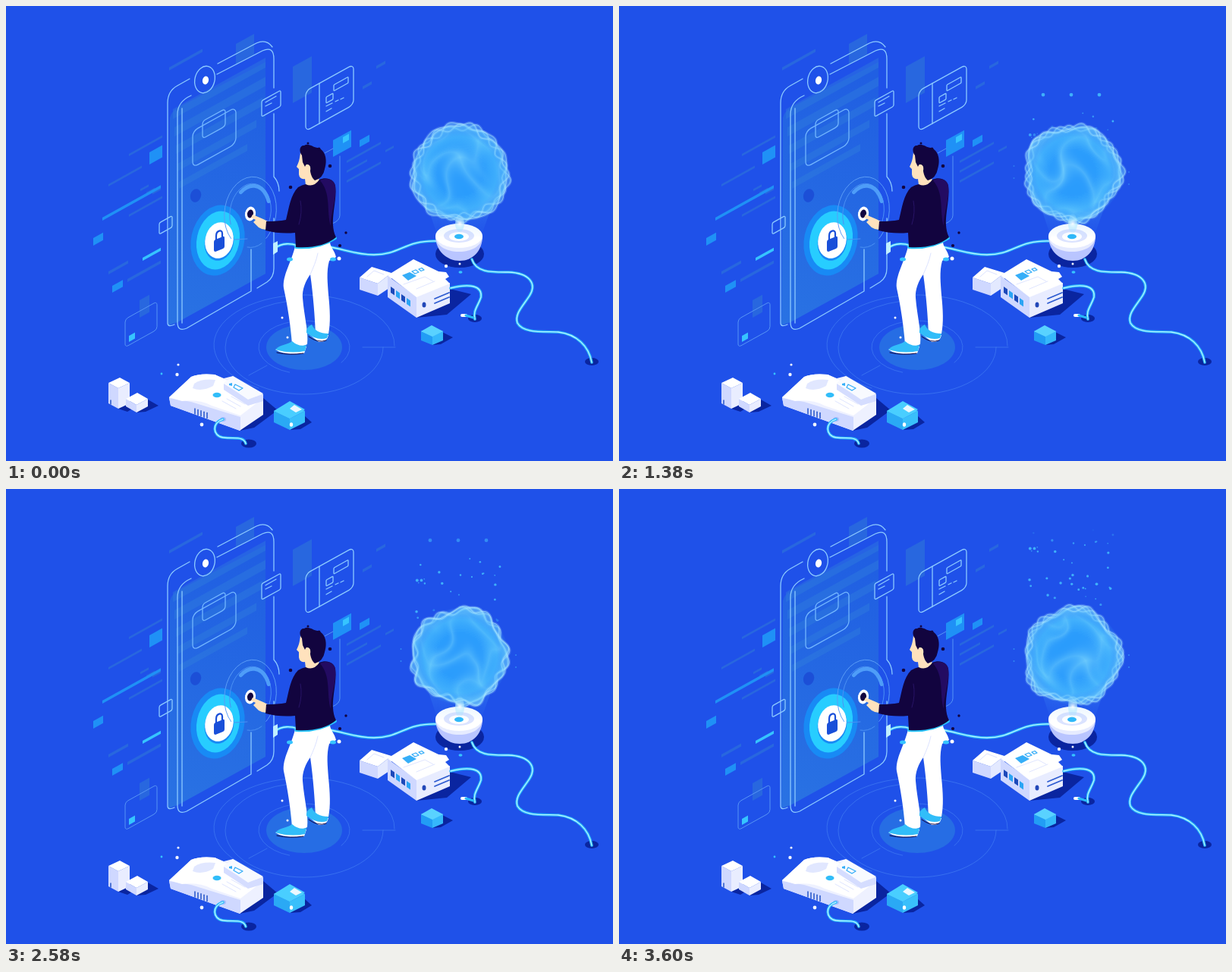
An HTML page with a canvas that plays this animation: 800 by 600 pixels, repeating every 3.63 s.

```html
<!DOCTYPE html>
<html lang="en">
<head>
<meta charset="utf-8">
<title>Isometric lock screen</title>
<style>
  html, body { margin: 0; width: 100%; height: 100%; overflow: hidden; background: #1f51e9; }
  canvas { display: block; }
</style>
</head>
<body>
<canvas id="stage" width="800" height="600"></canvas>
<script>
const LOOP = 3630, TAU = Math.PI * 2;
const DIM = '#2867df', BRIGHT = '#1f91f6', CYAN = '#36c4ff', PALE = '#8ccaff',
      SHADE = '#0a25a0', NAVY = '#12043f', SKIN = '#ffe2bd', LILAC = '#cfd8ff';
const stage = document.getElementById('stage').getContext('2d');
const scene = makeCanvas(800, 600);
let g = scene;

function makeCanvas(w, h) {
  const c = document.createElement('canvas');
  c.width = w;
  c.height = h;
  return c.getContext('2d');
}
const repeat = (count, draw) => { for (let i = 0; i < count; i++) draw(i); };
const clamp = v => Math.max(0, Math.min(1, v));
function random(seed) {
  const v = Math.sin(seed * 127.1 + 3.7) * 43758.5;
  return v - Math.floor(v);
}
function fill(color, d) {
  g.fillStyle = color;
  g.fill(new Path2D(d));
}
function line(color, d, width = 1.3) {
  g.strokeStyle = color;
  g.lineWidth = width;
  g.lineCap = g.lineJoin = 'round';
  g.stroke(new Path2D(d));
}
function oval(color, x, y, rx, ry = rx, tilt = 0) {
  g.fillStyle = color;
  g.beginPath();
  g.ellipse(x, y, rx, ry, tilt, 0, TAU);
  g.fill();
}
function ring(color, x, y, rx, ry, width = 1, from = 0, to = TAU, tilt = 0) {
  g.strokeStyle = color;
  g.lineWidth = width;
  g.beginPath();
  g.ellipse(x, y, rx, ry, tilt, from, to);
  g.stroke();
}
// Rectangle lying on the tilted wall plane
function wallPath(x, y, w, h, r) {
  g.save();
  g.transform(1, -.555, 0, 1, x, y);
  g.beginPath();
  g.roundRect(0, 0, w, h, r);
  g.restore();
}
function slab(color, x, y, w, h) {
  wallPath(x, y, w, h, 0);
  g.fillStyle = color;
  g.fill();
}
function frame(color, x, y, w, h, r = 2, width = 1.3) {
  wallPath(x, y, w, h, r);
  g.strokeStyle = color;
  g.lineWidth = width;
  g.stroke();
}
// Block seen from above; x, y is the near corner of its top
function box(x, y, left, right, drop, rise, top, leftFace, rightFace) {
  fill(leftFace, `M${x},${y} l${-left},${-rise} v${drop} l${left},${rise} z`);
  fill(rightFace, `M${x},${y} l${right},${-rise} v${drop} l${-right},${rise} z`);
  fill(top, `M${x},${y} l${-left},${-rise} l${right},${-rise} l${left},${rise} z`);
}
function cable(d) {
  line('#27b9fb', d, 3.6);
  line('#b7f0ff', d, 1.3);
}

function drawWall() {
  const glass = g.createLinearGradient(225, 420, 345, 100);
  glass.addColorStop(0, '#2972e3');
  glass.addColorStop(1, '#205fe2');
  fill(glass, 'M216,148 Q217,140 227,134 L342,74 V353 L226,417 L214,421 Z');

  // Text-like streaks
  repeat(5, i => slab('rgba(50,130,220,.36)', 220 + i * 2, 136 + i * 24, 122 - i * i * 2, 13 - i));
  repeat(3, i => slab(DIM, i % 2 ? 135 : 162, 195 + i * 40, 44, 3));
  repeat(3, i => slab(DIM, 449, 204 + i * 13, 45 - (i % 2) * 18, 3));
  repeat(3, i => slab(DIM, 177 + i * 8, 238 - i * 4 + random(i) * 20, 11, 3));
  repeat(2, i => slab(DIM, 488 - i * 18, 79 + i * 27, 12, 4));
  repeat(2, i => slab(DIM, 135 + i * 25, 350 + i * 10, 26 + i * 18, 4));
  slab(DIM, 500, 190, 11, 3);
  slab(DIM, 215, 81, 44, 4);
  slab(DIM, 303, 50, 24, 27);
  slab(DIM, 378, 80, 25, 48);
  slab(DIM, 176, 388, 13, 23);
  slab(BRIGHT, 127, 279, 77, 4);
  slab(BRIGHT, 189, 193, 17, 16);
  slab(BRIGHT, 115, 306, 13, 10);
  slab(BRIGHT, 140, 369, 14, 9);
  slab(BRIGHT, 431, 177, 24, 22);
  slab(BRIGHT, 466, 177, 13, 9);
  slab(CYAN, 180, 332, 24, 4);
  slab(CYAN, 162, 435, 8, 8);
  slab(CYAN, 444, 173, 8, 8);
  frame('#5795f5', 157, 413, 42, 37, 4, 1);
  line('#5795f5', 'M420,194 L431,188 M440,198 V276 Q440,283 430,287', 1);

  // Phone outlines
  line(PALE, 'M213,418 V128 Q213,112 226,105 L242,96 M213,418 Q213,424 222,420');
  line(PALE, 'M279,76 L330,49 Q343,43 351,54 M278,90 L338,59 Q353,52 353,70 V108 M353,142 V225 Q360,233 360,244');
  line(PALE, 'M353,280 V346 Q353,358 344,364 L331,372');
  line(PALE, 'M244,118 Q226,126 226,143 V417 Q226,430 238,425 L323,376 V321 M232,135 V418');
  ring(PALE, 262, 97, 13, 18, 1.3, 0, TAU, .25);
  oval('#fff', 263, 98, 4, 5.5, .25);
  frame('#72b6ff', 246, 165, 57, 48, 7);
  frame('#72b6ff', 259, 152, 30, 23, 4);
  slab('rgba(31,81,233,.8)', 337, 125, 25, 21);
  frame(PALE, 337, 125, 25, 21);
  line(PALE, 'M342,127 L356,119 M342,132 L350,128');
  frame(PALE, 202, 286, 17, 15);
  oval('#1c4fd7', 250, 250, 7, 9, .3);

  // Bank-card panel
  frame(PALE, 395, 112, 63, 53, 6);
  line(PALE, 'M413,102 V155 M422,132 L430,128 M434,126 L438,124 M441,123 L445,121 M422,139 L429,135');
  frame(PALE, 432, 104, 19, 8, 1);
  frame(PALE, 422, 120, 9, 8, 1);

  // Lock
  oval('#188af5', 279, 309, 35, 47, .22);
  oval('#27cdff', 279.5, 309, 28, 39, .22);
  oval('#188af5', 281, 311, 19, 25, .22);
  oval('#fff', 281, 309, 18.5, 24, .22);
  fill('#194fd9', 'M274,311 Q274,309 276,308 L286,304 Q288,303 288,306 V317 Q288,319 286,320 L276,324 Q274,324 274,322 Z');
  line('#194fd9', 'M277,308 V303 C277,296 285,294 285,300 V305', 2.2);

  // Touch rings
  ring('#5b9df7', 322, 272, 34, 47, 1, 2.2, 7, .15);
  ring('#4b91f4', 322, 272, 27, 38, 1, 2.6, 6.5, .15);
  ring('#4e9df8', 323, 272, 24, 35, 5, 3.9, 5.75, .15);
  line('#4b91f4', 'M301,308 L318,307 M318,318 Q328,320 337,313', 1);
  oval('#fff', 322, 274, 7, 9.5, .2);
  oval(NAVY, 322, 274, 4, 5.5, .2);
}

function drawFloor() {
  const faint = 'rgba(78,139,246,.65)';
  ring(faint, 393, 447, 119, 66, .8, 2.1, 6.3);
  ring(faint, 393, 450, 104, 62, .8, 0, 4.5);
  ring(faint, 393, 450, 60, 35, .8, 1.9, 6.9);
  line(faint, 'M470,450 H513 M344,474 L320,487', .8);
  oval('#266de4', 393, 450, 50, 30);
}

function drawMan() {
  // Legs
  fill('#fff', `M381,317 L427,312 C428,319 433,322 435,331 L426,336 C422,350 424,366 425,381
    C427,400 428,418 425,432 Q417,439 408,432 C407,410 405,382 401,354 C395,362 390,374 391,385
    C393,410 399,430 397,446 Q387,452 377,446 C375,420 371,395 366,372 C364,356 376,338 381,317 Z`);
  line('#dce3ff', 'M401,354 C405,345 409,336 411,326', 1);
  // Shoes
  fill('#fff', 'M355,453 Q366,461 393,458 L396,449 L380,447 Z M396,430 L412,443 Q423,444 425,434 L408,430 Z');
  line(NAVY, 'M357,457 Q374,461 392,458 M399,436 Q411,445 422,441', 1);
  fill('#31bdf9', 'M355,453 C361,446 372,447 377,442 Q386,450 396,447 L394,455 Q374,459 355,453 Z');
  fill('#31bdf9', 'M396,431 Q395,424 403,420 Q408,432 425,432 L423,438 Q410,442 396,431 Z');
  // Head
  fill(SKIN, `M388,193 C387,202 386,206 383,212 L386,215 L386,222 Q387,229 394,228
    L395,236 Q405,242 413,232 L411,219 L414,201 L398,191 Z`);
  fill(NAVY, `M390,197 C385,190 388,183 393,184 C399,180 405,187 411,187 C421,190 424,203 420,215
    Q418,227 407,230 C402,226 401,219 400,211 Q396,206 394,212 L391,206 Z`);
  fill(SKIN, 'M395,211 q4,-4 6,1 q1,6 -2,7 z');
  // Hand
  fill(SKIN, 'M347,285 L339,281 Q332,278 325,275 L323,279 L329,282 L326,285 L333,292 Q339,296 346,294 Z');
  // Sweater
  line('#29c4fa', 'M382,318 Q412,320 434,306', 4);
  fill(NAVY, `M395,235 Q405,240 413,229 C422,225 432,228 434,237 C437,259 425,284 435,305
    Q417,320 382,318 L381,299 Q361,301 342,296 L343,284 Q358,284 369,282
    C373,266 375,249 385,239 Q390,236 395,235 Z`);
  fill('#230b62', 'M414,230 C422,226 432,228 434,237 C436,257 427,275 428,290 C422,270 429,248 414,230 Z');
  line('#281466', 'M388,257 Q391,272 386,288', 1);
  // Flecks
  repeat(3, i => oval(NAVY, 398 + i * 14.5, 181 + i * i * 7.5, 1.5 + i * .4));
  repeat(2, i => oval(NAVY, 448 - i * 8, 299 + i * 17, 1.7 + i * .4));
  oval(NAVY, 375, 239, 2.3);
  repeat(2, i => oval('#fff', 364 + i * 7, 411 + i * 26, 1.5));
  repeat(2, i => oval(CYAN, 374 + i * 57, 334, 4, 2.5));
  oval('#fff', 439, 333, 2.5);
}

function drawGadgets() {
  // Base of the orb
  oval(SHADE, 598, 327, 32, 18);
  fill('#b9c5ff', 'M566,303 C566,323 581,336 598,336 S628,323 628,303 Z');
  fill('#e6ebff', 'M566,303 C566,316 580,324 597,324 S628,316 628,303 Z');
  oval('#fff', 597, 303, 31, 16);
  oval('#dbe3ff', 597, 303, 20, 9);
  oval('#fff', 597, 304, 13, 6);
  oval('#2fb8f8', 597, 304, 6, 3.3);
  oval(SHADE, 772, 469, 9, 5);
  cable(`M614,334 C620,352 640,351 662,351 C690,352 700,366 690,382 C681,396 670,406 674,418
    C682,432 708,429 728,430 C752,433 768,448 772,470`);

  // Console and its neighbour
  fill(SHADE, 'M541,411 L581,407 L613,380 L585,373 Z');
  fill(LILAC, 'M466,358 L490,366 V382 L466,374 Z');
  fill('#e3e9ff', 'M490,366 L508,352 V370 L490,382 Z');
  fill('#fff', 'M466,358 L482,344 L508,352 L490,366 Z');
  line('#dbe2ff', 'M476,357 L485,349 L498,354', 1);
  fill(LILAC, 'M503,356 L541,383 V411 L503,384 Z');
  fill('#e8ecff', 'M541,383 L585,365 V392 L541,411 Z');
  fill('#fff', 'M503,355 L537,334 L570,350 L580,351 L584,357 L579,360 L585,366 L541,384 Z');
  line('#e0e6ff', 'M524,367 L552,357 L563,363 M541,373 L565,363', 1);
  fill('#36aef8', 'M522,355 L532,351 L541,356 L530,362 Z');
  line('#36aef8', 'M535,350 l5,-2 l4,3 l-5,2 z M544,347 l4,-1.5 l3,2.5 l-4,1.5 z');
  repeat(4, i => fill(i % 2 ? '#2aa4f4' : '#1c49ba', `M${507 + i * 7},${370 + i * 5} l5,3.6 v8 l-5,-3.6 z`));
  oval('#2248b8', 551, 394, 2.5, 3.5);
  line('#2d5bd0', 'M565,386 L584,378 M565,392 L584,384', 1.8);
  oval(SHADE, 618, 412, 9, 5);
  cable('M586,372 C610,366 628,368 626,384 C622,396 615,402 618,413');
  line('#fff', 'M601,408 L606,408', 4);
  line('#27b9fb', 'M606,408 L616,411', 3);

  // Small cyan cube
  fill(SHADE, 'M562,447 L573,446 L589,437 L575,430 Z');
  box(562, 435, 15, 14, 12, 6, '#59d2ff', '#229df5', '#35b8fb');
  fill('#59d2ff', 'M547,429 L561,421 L576,429 L562,436 Z');

  // White blocks
  fill(SHADE, 'M148,531 L163,524 L170,529 L160,535 Z M172,536 L184,535 L201,527 L187,519 Z');
  box(148, 504, 13, 15, 27, 7, '#fff', LILAC, '#e9edff');
  box(172, 526, 14, 15, 10, 8, '#fff', LILAC, '#e9edff');
  line('#2554c9', 'M138,520 V525', 1.5);

  // Terminal
  fill(SHADE, 'M308,560 L327,556 L358,533 L339,517 Z');
  fill('#eef1ff', 'M215,516 L244,489 Q255,484 275,486 L287,491 L299,488 L339,512 V539 L308,560 L217,527 Z');
  fill(LILAC, 'M215,517 L244,522 L309,542 V560 L217,527 Z');
  fill('#fff', 'M215,516 L244,489 Q255,484 275,486 L339,517 L309,540 L271,527 Q255,518 232,521 Z');
  fill('#e1e7ff', 'M248,498 Q258,491 276,493 L273,501 Q258,509 246,504 Z');
  fill('#d5ddff', 'M287,498 L319,518 L339,512 V521 L319,527 L287,506 Z');
  fill('#f8faff', 'M287,497 L299,488 L339,511 L319,519 Z');
  line('#36aef8', 'M302,499 L312,504 L307,507 L300,503 Z');
  fill('#36aef8', 'M294,498 l4,-1 v4 l-4,-1 z');
  oval('#31bdf9', 278, 513, 5.5, 3.2);
  repeat(3, i => line('#dee5ff', `M${285 + i * 6},${521 - i * 3} l18,10`, 1));
  repeat(5, i => line('#2554c9', `M${249 + i * 4},${531 + i * 1.4} v7`, 1.5));
  oval('#a9bdfc', 286, 545, 4, 3);
  oval(SHADE, 320, 577, 10, 5.5);
  cable('M286,545 C271,549 272,567 286,569 C302,571 313,567 316,577');

  // Cyan package
  fill(SHADE, 'M374,559 L388,558 L403,549 L394,541 Z');
  box(374, 544, 21, 20, 15, 10, '#49ceff', '#2aa9f5', '#39bffb');
  fill('#49ceff', 'M353,534 L374,521 L394,532 L374,544 Z');
  fill('#eaf8ff', 'M374,531 L380,526 L390,532 L382,536 Z');
  oval('#fff', 376, 552, 2.2, 2.8);

  // Crumbs
  repeat(2, i => oval('#eef3ff', 227 - i * 1.5, 473 + i * 13, 1.6 + i * .6));
  repeat(2, i => oval('#eef3ff', 580 + i * 18, 343 - i * 3, 2.2 - i * .7));
  oval('#eef3ff', 258, 552, 2.4);
  oval(CYAN, 205, 485, 1.4);
  oval(CYAN, 599, 351, 2.5, 1.8);
}

function drawScene() {
  g.fillStyle = '#1f51e9';
  g.fillRect(0, 0, 800, 600);
  drawWall();
  drawFloor();
  cable('M355,319 C364,312 376,313 384,316');
  cable('M424,317 C450,322 462,328 485,328 C520,328 525,309 567,310');
  fill('#c0efff', 'M352,313 l6,-3 v14 l-6,4 z');
  drawGadgets();
  drawMan();
}

const CX = 598, CY = 220, SIZE = 140;

// Sparks rise at one speed and show once they clear the orb
function drawSparks(t) {
  repeat(42, i => {
    const big = i < 3;
    const x = big ? 559 + i * 37 : 541 + random(i) * 112;
    const y = (big ? 174 : 196 + random(i + 50) * 105) - t * .0412;
    const rim = CY - Math.sqrt(66 ** 2 - (x - CX) ** 2);
    const alpha = clamp((rim + 8 - y) / 28) * clamp((y - 52) / 25);
    oval(`rgba(62,175,250,${alpha})`, x, y, big ? 2.4 : .7 + random(i + 100) * 1.3);
  });
  repeat(4, i => oval(`rgba(62,175,250,${clamp(t / 1800) * .6})`,
    i % 2 ? 672 : 520.5, 211 + i * 8, 1));
}

const texture = makeCanvas(SIZE, SIZE);
const pixels = texture.createImageData(SIZE, SIZE);

// Folds of light flowing over a bulged disc
function paintTexture(t) {
  const s = t * .0012, half = SIZE / 2;
  for (let j = 0, k = 0; j < SIZE; j++) {
    for (let i = 0; i < SIZE; i++, k += 4) {
      const x = (i - half) / 63, y = (j - half) / 63, d = x * x + y * y;
      const bulge = 4.4 / (.6 + Math.sqrt(Math.max(0, 1 - d)));
      let u = x * bulge + s * .5, v = y * bulge;
      for (let n = 1; n < 4; n++) {
        u += .5 * Math.sin(1.4 * v + s + n * 2);
        v += .5 * Math.sin(1.5 * u - s + n);
      }
      const fold = (1 - Math.abs(Math.sin(u * .9 + v * .5))) ** 2
                 + (1 - Math.abs(Math.sin(v * .9 - u * .4))) ** 2;
      const light = fold * .27 + d * d * .1;
      pixels.data[k] = 44 + light * 125;
      pixels.data[k + 1] = 160 + light * 88;
      pixels.data[k + 2] = 253;
      pixels.data[k + 3] = 255 * .94 * clamp((1.04 - d) * 2.2);
    }
  }
  texture.putImageData(pixels, 0, 0);
}

// Ruffled outline; each layer turns its own way
function ruffle(t, layer) {
  const path = new Path2D(), s = t * .0018, way = layer % 2 ? -1 : 1;
  repeat(180, i => {
    const a = i / 180 * TAU, turn = a + way * s * .35 + layer * 1.9;
    const r = 61 + 3.4 * Math.sin(9 * turn + s) + 2.6 * Math.sin(5 * turn - s * 1.4)
      + 1.7 * Math.sin(14 * turn + layer) + 1.4 * Math.sin(3 * a + s);
    path.lineTo(CX + r * Math.cos(a), CY + r * Math.sin(a));
  });
  path.closePath();
  return path;
}

function drawOrb(t) {
  const beam = g.createLinearGradient(0, 262, 0, 304);
  beam.addColorStop(0, 'rgba(80,175,255,.24)');
  beam.addColorStop(1, 'rgba(80,175,255,.02)');
  fill(beam, 'M555,262 H641 L626,304 H569 Z');

  paintTexture(t);
  g.drawImage(texture.canvas, CX - SIZE / 2, CY - SIZE / 2);

  const veil = g.createRadialGradient(CX, CY, 30, CX, CY, 70);
  veil.addColorStop(0, 'rgba(80,190,255,0)');
  veil.addColorStop(.6, 'rgba(80,190,255,.2)');
  veil.addColorStop(1, 'rgba(130,222,255,.48)');
  repeat(4, layer => {
    const path = ruffle(t, layer);
    g.fillStyle = veil;
    g.fill(path);
    g.strokeStyle = 'rgba(175,234,255,.2)';
    g.lineWidth = 3.5;
    g.stroke(path);
    g.strokeStyle = 'rgba(180,238,255,.5)';
    g.lineWidth = 1;
    g.stroke(path);
  });

  const flare = g.createRadialGradient(598, 287, 0, 598, 287, 15);
  flare.addColorStop(0, 'rgba(255,255,255,.95)');
  flare.addColorStop(.4, 'rgba(180,235,255,.6)');
  flare.addColorStop(1, 'rgba(130,215,255,0)');
  oval(flare, 598, 287, 6, 11 + 5 * t / LOOP);
}

function render(now) {
  const t = now % LOOP;
  g = stage;
  g.drawImage(scene.canvas, 0, 0);
  drawSparks(t);
  drawOrb(t);
  requestAnimationFrame(render);
}

drawScene();
requestAnimationFrame(render);
</script>
</body>
</html>
```
